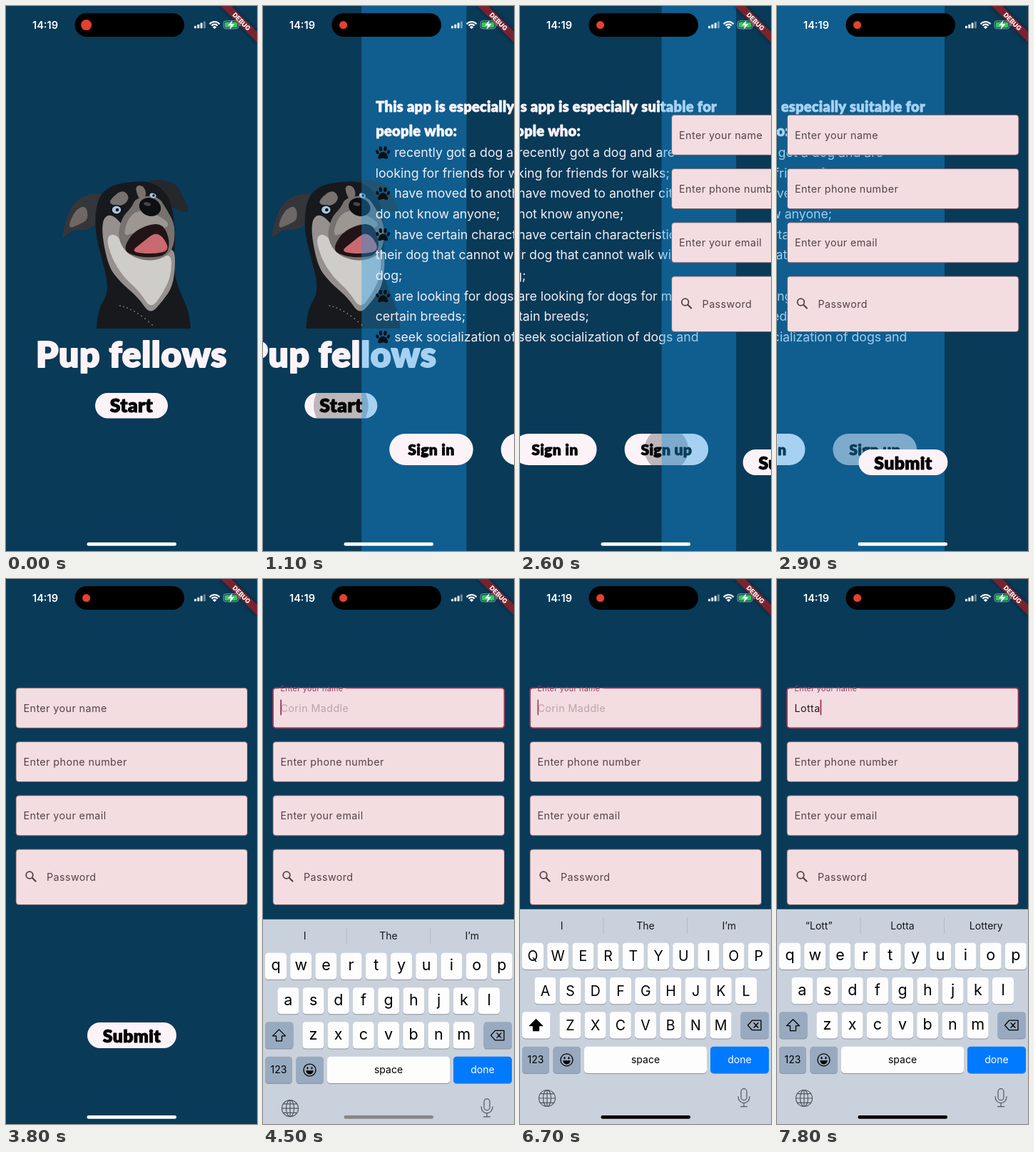
Animation of 352x762 px, one loop 8 s. Source, as an HTML page with a canvas:

```html
<!DOCTYPE html>
<html lang="en">
<head>
<meta charset="utf-8">
<title>Pup fellows</title>
<style>
html, body { margin: 0; width: 100%; height: 100%; overflow: hidden; background: #000; }
canvas { display: block; width: 352px; height: 762px; }
</style>
</head>
<body>
<canvas id="stage"></canvas>
<script>
const W = 352, H = 762, LOOP = 8000;
const canvas = document.getElementById('stage');
const ctx = canvas.getContext('2d');
const dpr = window.devicePixelRatio || 1;
canvas.width = W * dpr;
canvas.height = H * dpr;

const SANS = 'Inter, Roboto, "Liberation Sans", sans-serif';
const DISPLAY = 'Lato, "Open Sans", sans-serif';
const PAGE_TINT = 'rgba(24,153,232,0.38)';
const BUTTON = '#fcf3f8';
const INK = '#524347';
const ACCENT = '#9b3557';

const SLIDES = [{ at: 1016, from: 0 }, { at: 2540, from: 1 }];
const SLIDE_MS = 380;
const FOCUS = 4180, SHIFT_ON = 6380;
const NAME = 'Lotta', HINT = 'Corin Maddle';
const TYPE_AT = 7080, TYPE_GAP = 150, PRESS_MS = 80;
const HINTS = [
  ['I', 'The', 'I’m'], ['“L”', 'Let', 'Look'], ['“Lo”', 'Look', 'Love'],
  ['“Lot”', 'Lots', 'Lot'], ['“Lott”', 'Lotta', 'Lottery'], ['“Lotta”', 'Lottery', 'Lots']
];
const ROWS = [
  { keys: 'qwertyuiop', x: 3, y: 47 },
  { keys: 'asdfghjkl', x: 20.4, y: 95.3 },
  { keys: 'zxcvbnm', x: 55.4, y: 143.5 }
];
const KEY_W = 30, KEY_H = 37.2, PITCH = 35.2;

const clamp = v => Math.max(0, Math.min(1, v));
const mix = (a, b, k) => a + (b - a) * k;

// CSS-style cubic easing, solved by bisection
function bezier(x1, y1, x2, y2) {
  const at = (a, b, s) => 3 * a * s * (1 - s) ** 2 + 3 * b * s * s * (1 - s) + s ** 3;
  return t => {
    let lo = 0, hi = 1;
    for (let i = 0; i < 24; i++) {
      const mid = (lo + hi) / 2;
      if (at(x1, x2, mid) < t) lo = mid; else hi = mid;
    }
    return at(y1, y2, lo);
  };
}
const easeHead = bezier(0.283, 0.044, 0.545, 0.57);
const easeTail = bezier(0.209, 1, 0.4345, 0.976);
const slideIn = t => t < 0.198 ? 0.541 * easeHead(t / 0.198) : 0.541 + 0.459 * easeTail((t - 0.198) / 0.802);
const slideOut = bezier(0.35, 0.91, 0.33, 0.97);

function text(str, x, y, size, color, { font = SANS, weight = 400, align = 'left', gap = 0, bold = 0 } = {}) {
  ctx.font = `${weight} ${size}px ${font}`;
  ctx.textAlign = align;
  ctx.letterSpacing = gap + 'px';
  ctx.fillStyle = color;
  ctx.fillText(str, x, y);
  if (bold) {
    ctx.strokeStyle = color;
    ctx.lineWidth = bold;
    ctx.lineJoin = 'round';
    ctx.strokeText(str, x, y);
  }
  const width = ctx.measureText(str).width;
  ctx.letterSpacing = '0px';
  return width;
}
const display = (str, x, y, size, color, align = 'left') =>
  text(str, x, y, size, color, { font: DISPLAY, weight: 900, align, gap: size * 0.015, bold: size * 0.04 });

function box(x, y, w, h, r, fill) {
  ctx.beginPath();
  ctx.roundRect(x, y, w, h, r);
  if (fill) { ctx.fillStyle = fill; ctx.fill(); }
}

function oval(x, y, rx, ry, fill, turn = 0) {
  ctx.beginPath();
  ctx.ellipse(x, y, rx, ry, turn, 0, 7);
  ctx.fillStyle = fill;
  ctx.fill();
}

// Closed smooth shape through the midpoints of its corners
function blob(fill, ...p) {
  const n = p.length / 2;
  const pt = i => [p[(i % n) * 2], p[(i % n) * 2 + 1]];
  ctx.beginPath();
  for (let i = 0; i <= n; i++) {
    const [ax, ay] = pt(i), [bx, by] = pt(i + 1);
    const mx = (ax + bx) / 2, my = (ay + by) / 2;
    if (i) ctx.quadraticCurveTo(ax, ay, mx, my); else ctx.moveTo(mx, my);
  }
  ctx.fillStyle = fill;
  ctx.fill();
}

function stroke(color, width, draw) {
  ctx.beginPath();
  draw();
  ctx.strokeStyle = color;
  ctx.lineWidth = width;
  ctx.lineCap = ctx.lineJoin = 'round';
  ctx.stroke();
}

function poly(...p) {
  ctx.moveTo(p[0], p[1]);
  for (let i = 2; i < p.length; i += 2) ctx.lineTo(p[i], p[i + 1]);
}

function button(label, x, y, w, h, size, base, ripple = 0) {
  box(x, y, w, h, h / 2, BUTTON);
  if (ripple > 0) {
    ctx.save();
    ctx.clip();
    oval(x + w / 2, y + h / 2, ripple, ripple, 'rgba(0,0,0,0.25)');
    ctx.restore();
  }
  display(label, x + w / 2, base, size, '#050505', 'center');
}

function dog() {
  ctx.save();
  ctx.beginPath();
  ctx.rect(78, 240, 184, 211);
  ctx.clip();
  // ears
  blob('#35363a', 142, 264, 118, 262, 98, 272, 86, 290, 78, 326, 82, 322, 96, 312, 112, 314, 126, 306, 142, 290);
  blob('#6f6763', 112, 278, 96, 286, 86, 312, 102, 306, 116, 298);
  blob('#26282c', 192, 245, 222, 242, 242, 252, 246, 264, 258, 286, 250, 289, 238, 284, 222, 276);
  // head and neck
  blob('#17191d', 128, 268, 148, 250, 180, 245, 206, 246, 226, 262, 234, 285, 238, 325, 234, 365,
    242, 396, 258, 430, 260, 475, 126, 475, 128, 425, 146, 398, 132, 345, 124, 310);
  // chest
  blob('#96918e', 132, 300, 150, 288, 180, 330, 234, 336, 238, 356, 234, 392, 220, 412, 202, 432, 186, 408, 160, 386, 142, 362);
  blob('#cfcdca', 140, 322, 156, 318, 174, 350, 206, 358, 232, 344, 232, 376, 220, 402, 203, 424, 188, 400, 164, 378, 148, 352);
  // face
  blob('#77726f', 146, 270, 164, 256, 174, 268, 164, 280, 146, 278);
  blob('#77726f', 180, 252, 192, 250, 198, 264, 188, 274);
  blob('#77726f', 182, 268, 212, 264, 226, 285, 238, 308, 234, 345, 206, 358, 172, 350, 156, 325, 162, 296, 176, 282);
  blob('#9d9793', 172, 294, 190, 284, 212, 292, 230, 304, 222, 312, 198, 308, 178, 318, 164, 322);
  blob('#211416', 164, 342, 176, 318, 198, 306, 220, 304, 230, 328, 226, 348, 204, 352, 182, 350);
  blob('#c96a70', 174, 344, 192, 330, 208, 317, 220, 322, 230, 342, 206, 347);
  oval(202, 281, 15.5, 12.5, '#0e0f12', 0.35);
  oval(198, 277, 5, 2.5, '#45474c', 0.2);
  oval(155, 285, 8, 7, '#0d0e10');
  oval(155, 285, 6.3, 5.4, '#a5c6e2');
  oval(156, 285, 2.3, 2.3, '#101214');
  oval(206, 265, 4.6, 3.2, '#a5c6e2', 0.4);
  oval(207, 265, 1.7, 1.7, '#101214');
  for (let i = 0; i < 10; i++) oval(160 + i * 5, 419 + i * 1.2 + i * i * 0.2, 0.9, 0.9, '#85837f');
  ctx.restore();
}

function startPage(t) {
  dog();
  display('Pup fellows', 176, 505, 49.5, BUTTON, 'center');
  button('Start', 125, 541, 102, 35.5, 26.5, 568, (t - 1000) * 0.38);
}

function paw(x, y) {
  const c = '#0c1116';
  blob(c, x - 4, y - 1, x + 4, y - 1, x + 8, y + 8, x + 4, y + 9, x, y + 7, x - 4, y + 9, x - 8, y + 8);
  for (const s of [-1, 1]) {
    oval(x + s * 3.3, y - 5.5, 2.2, 3.3, c, s * 0.1);
    oval(x + s * 7.8, y - 0.8, 2, 2.9, c, s * 0.4);
  }
}

const LINES = [
  '*recently got a dog and are', 'looking for friends for walks;',
  '*have moved to another city and', 'do not know anyone;',
  '*have certain characteristics in', 'their dog that cannot walk with any', 'dog;',
  '*are looking for dogs for mating of', 'certain breeds;',
  '*seek socialization of dogs and'
];

function infoPage(t) {
  display('This app is especially suitable for', 20, 148, 20, BUTTON);
  display('people who:', 20, 181.5, 20, BUTTON);
  LINES.forEach((line, i) => {
    const y = 211 + i * 28.65, item = line[0] === '*';
    if (item) paw(30, y - 6);
    text(item ? line.slice(1) : line, item ? 46 : 19.5, y, 17.72, '#f1eef3');
  });
  button('Sign in', 39, 598, 117.5, 44, 21.1, 628);
  button('Sign up', 195.5, 598, 117.5, 44, 21.1, 628, (t - 2520) * 0.38);
}

const typedAt = t => NAME.slice(0, Math.max(0, Math.floor((t - TYPE_AT - PRESS_MS) / TYPE_GAP) + 1));

function caretAlpha(t) {
  if (t >= TYPE_AT + PRESS_MS) return 1;
  const p = ((t - FOCUS) % 1000) / 1000;
  return p < 0.5 ? 1 : p < 0.85 ? clamp(1 - (p - 0.5) / 0.15) : (p - 0.85) / 0.15;
}

function field(y, h, label, x = 24.5) {
  box(14, y, 324.5, h, 4, '#f4dde1');
  ctx.strokeStyle = '#705a61';
  ctx.lineWidth = 0.9;
  ctx.stroke();
  if (label) text(label, x, y + h / 2 + 5.3, 14.3, INK, { gap: 0.42 });
}

function nameField(t) {
  const k = clamp((t - FOCUS) / 167), on = t >= FOCUS;
  field(152.3, 56, on ? '' : 'Enter your name');
  if (!on) return;
  stroke(ACCENT, mix(0.9, 1.8, k), () => {
    const gap = mix(0, 47.5, k);
    ctx.moveTo(69.5 + gap, 152.3);
    ctx.arcTo(338.5, 152.3, 338.5, 208.3, 4);
    ctx.arcTo(338.5, 208.3, 14, 208.3, 4);
    ctx.arcTo(14, 208.3, 14, 152.3, 4);
    ctx.arcTo(14, 152.3, 60, 152.3, 4);
    ctx.lineTo(69.5 - gap, 152.3);
  });
  const s = mix(1, 0.75, k);
  text('Enter your name', 24.5, mix(185.6, 157, k), 14.3 * s, ACCENT, { gap: 0.42 * s });
  const typed = typedAt(t);
  let end = 0;
  if (typed) end = text(typed, 24.5, 185.6, 14.3, '#22191b', { gap: 0.42 });
  else {
    ctx.globalAlpha = k;
    text(HINT, 24.5, 185.6, 14.3, '#b9a6ab', { gap: 0.42 });
  }
  ctx.globalAlpha = caretAlpha(t);
  box(24.3 + end, 168.5, 1.8, 22, 0.9, ACCENT);
  ctx.globalAlpha = 1;
}

function formPage(t) {
  nameField(t);
  field(227.6, 56, 'Enter phone number');
  field(302.8, 56, 'Enter your email');
  field(378, 77.5, 'Password', 57);
  stroke(INK, 1.8, () => { ctx.arc(33, 414, 4.8, 0, 7); });
  stroke(INK, 2.2, () => poly(37, 418, 41.5, 422.5));
  button('Submit', 114, 620, 125, 36, 24.8, 647.5);
}

const PAGES = [startPage, infoPage, formPage];

function page(i, dx, t) {
  ctx.save();
  ctx.translate(dx, 0);
  ctx.fillStyle = PAGE_TINT;
  ctx.fillRect(0, 0, W, H);
  PAGES[i](t);
  ctx.restore();
}

function pages(t) {
  const move = SLIDES.find(s => t >= s.at && t < s.at + SLIDE_MS);
  if (move) {
    const u = (t - move.at) / SLIDE_MS;
    page(move.from, -W / 3 * slideOut(u), t);
    page(move.from + 1, W * (1 - slideIn(u)), t);
  } else {
    page(SLIDES.filter(s => t >= s.at).length, 0, t);
  }
}

function key(x, y, w, fill, label, size = 14, color = '#000') {
  box(x, y + 1, w, KEY_H, 4.5, '#8b929c');
  box(x, y, w, KEY_H, 4.5, fill);
  if (label) text(label, x + w / 2, y + KEY_H / 2 + 5, size, color, { align: 'center' });
}

function popup(x, y, label) {
  ctx.save();
  ctx.shadowColor = 'rgba(0,0,0,0.35)';
  ctx.shadowBlur = 4 * dpr;
  ctx.beginPath();
  ctx.moveTo(x, y + KEY_H - 4);
  ctx.lineTo(x, y + 6);
  ctx.bezierCurveTo(x, y - 3, x - 9, y - 4, x - 9, y - 13);
  ctx.arcTo(x - 9, y - 50, x + 15, y - 50, 9);
  ctx.arcTo(x + 39, y - 50, x + 39, y - 13, 9);
  ctx.lineTo(x + 39, y - 13);
  ctx.bezierCurveTo(x + 39, y - 4, x + 30, y - 3, x + 30, y + 6);
  ctx.arcTo(x + 30, y + KEY_H, x, y + KEY_H, 4.5);
  ctx.arcTo(x, y + KEY_H, x, y, 4.5);
  ctx.closePath();
  ctx.fillStyle = '#fdfdfe';
  ctx.fill();
  ctx.restore();
  text(label, x + 15, y - 13, 32, '#000', { align: 'center' });
}

function keyIcons(caps) {
  const arrow = () => {
    poly(22.5, 154, 31.5, 163, 26.5, 163, 26.5, 170, 18.5, 170, 18.5, 163, 13.5, 163);
    ctx.closePath();
  };
  stroke('#000', 1.3, arrow);
  if (caps) { ctx.fillStyle = '#000'; ctx.fill(); }
  stroke('#000', 1.3, () => {
    poly(319.5, 162.3, 325.5, 155.5, 338, 155.5, 338, 169, 325.5, 169);
    ctx.closePath();
    poly(328, 159, 334, 165.5);
    poly(334, 159, 328, 165.5);
  });
  stroke('#000', 1.3, () => ctx.arc(65.5, 210.7, 8.5, 0, 7));
  oval(62.5, 208, 1.1, 1.7, '#000');
  oval(68.5, 208, 1.1, 1.7, '#000');
  ctx.beginPath();
  ctx.arc(65.5, 211.5, 5.2, 0, Math.PI);
  ctx.fill();
  const grey = '#525960';
  stroke(grey, 1.2, () => {
    ctx.arc(38, 264.3, 11.5, 0, 7);
    ctx.moveTo(43.5, 264.3);
    ctx.ellipse(38, 264.3, 5.5, 11.5, 0, 0, 7);
    poly(26.5, 264.3, 49.5, 264.3);
    poly(38, 252.8, 38, 275.8);
    poly(29, 258, 47, 258);
    poly(29, 270.6, 47, 270.6);
  });
  stroke(grey, 1.2, () => {
    ctx.roundRect(310, 251, 8, 16, 4);
    ctx.moveTo(306, 262);
    ctx.bezierCurveTo(306, 274, 322, 274, 322, 262);
    poly(314, 271, 314, 276);
    poly(309.5, 276, 318.5, 276);
  });
}

function keyboard(t) {
  if (t < FOCUS) return;
  const w = (t - FOCUS) * 0.015;
  const caps = t >= SHIFT_ON && !typedAt(t);
  const show = c => caps ? c.toUpperCase() : c;
  const grey = '#98aabf', white = '#fdfdfe';
  ctx.save();
  ctx.translate(0, 461.7 + 300 * (1 + w) * Math.exp(-w));
  ctx.fillStyle = '#c9d1dc';
  ctx.fillRect(0, 0, W, 310);
  ctx.fillStyle = '#b3bcc8';
  ctx.fillRect(116.5, 11.5, 1, 23);
  ctx.fillRect(234, 11.5, 1, 23);
  HINTS[typedAt(t - 80).length].forEach((s, i) =>
    text(s, 58.7 + i * 117.3, 28, 14, '#14171a', { align: 'center' }));

  for (const { keys, x, y } of ROWS) {
    [...keys].forEach((c, i) => {
      const kx = x + i * PITCH;
      key(kx, y, KEY_W, white);
      text(show(c), kx + KEY_W / 2, y + (caps ? 25.7 : 24.5), caps ? 19.5 : 21.5, '#000', { align: 'center' });
    });
  }
  key(3, 143.5, 39.5, caps ? white : grey);
  key(309.5, 143.5, 39.5, grey);
  key(3, 192, 38, grey, '123');
  key(46.5, 192, 38.5, grey);
  key(90, 192, 172, white, 'space');
  key(267, 192, 82, '#007aff', 'done', 14, '#fff');
  keyIcons(caps);

  const n = Math.floor((t - TYPE_AT) / TYPE_GAP);
  if (n >= 0 && n < NAME.length && (t - TYPE_AT) % TYPE_GAP < PRESS_MS) {
    const c = NAME[n].toLowerCase();
    const row = ROWS.find(r => r.keys.includes(c));
    popup(row.x + row.keys.indexOf(c) * PITCH, row.y, show(c));
  }
  ctx.restore();
}

function banner() {
  ctx.save();
  ctx.translate(W, 0);
  ctx.rotate(Math.PI / 4);
  ctx.shadowColor = 'rgba(0,0,0,0.5)';
  ctx.shadowBlur = 5 * dpr;
  ctx.fillStyle = 'rgb(121,35,47)';
  ctx.fillRect(-36.1, 25.3, 72.2, 10.8);
  ctx.shadowColor = 'transparent';
  text('DEBUG', 0, 34, 9, '#fff', { weight: 800, align: 'center' });
  ctx.restore();
}

function statusBar(t) {
  text('14:19', 55, 31.7, 14.6, '#fff', { weight: 600, align: 'center' });
  box(96.5, 10, 153.5, 33, 16.5, '#000');
  const shrink = clamp((t - 100) / 600);
  const r = mix(7.5, 5.5, shrink * shrink * (3 - 2 * shrink));
  oval(112.6, 26.6, r, r, '#e5412f');

  for (let i = 0; i < 4; i++) {
    const h = 3.5 + i * 2.1;
    box(264 + i * 4.3, 31.3 - h, 2.9, h, 0.8, i < 3 ? '#fff' : 'rgba(255,255,255,0.4)');
  }
  for (const d of [9, 5.4]) {
    ctx.beginPath();
    ctx.arc(292.5, 31, d, -Math.PI * 0.78, -Math.PI * 0.22);
    ctx.strokeStyle = '#fff';
    ctx.lineWidth = 2.2;
    ctx.lineCap = 'butt';
    ctx.stroke();
  }
  ctx.beginPath();
  ctx.moveTo(292.5, 32);
  ctx.arc(292.5, 32, 3.8, -Math.PI * 0.77, -Math.PI * 0.23);
  ctx.fillStyle = '#fff';
  ctx.fill();

  box(305, 20.8, 21, 11, 3.4);
  ctx.strokeStyle = 'rgba(255,255,255,0.5)';
  ctx.lineWidth = 1;
  ctx.stroke();
  box(306.6, 22.4, 17.8, 7.8, 2, '#35c759');
  box(327.4, 24.3, 1.3, 4, 0.6, 'rgba(255,255,255,0.5)');
  ctx.beginPath();
  poly(317.5, 20, 311, 27.3, 315.2, 27.3, 313.6, 33, 320.4, 25.2, 316, 25.2);
  ctx.closePath();
  ctx.fillStyle = '#fff';
  ctx.fill();
}

function draw(t) {
  ctx.setTransform(dpr, 0, 0, dpr, 0, 0);
  ctx.fillStyle = '#000';
  ctx.fillRect(0, 0, W, H);
  pages(t);
  banner();
  keyboard(t);
  statusBar(t);
  const v = Math.round(mix(255, 0, clamp((t - 4250) / 530)));
  box(113.5, 750, 125.5, 4.8, 2.4, `rgb(${v},${v},${v})`);
}

function tick() {
  draw(performance.now() % LOOP);
  requestAnimationFrame(tick);
}
tick();
</script>
</body>
</html>
```
